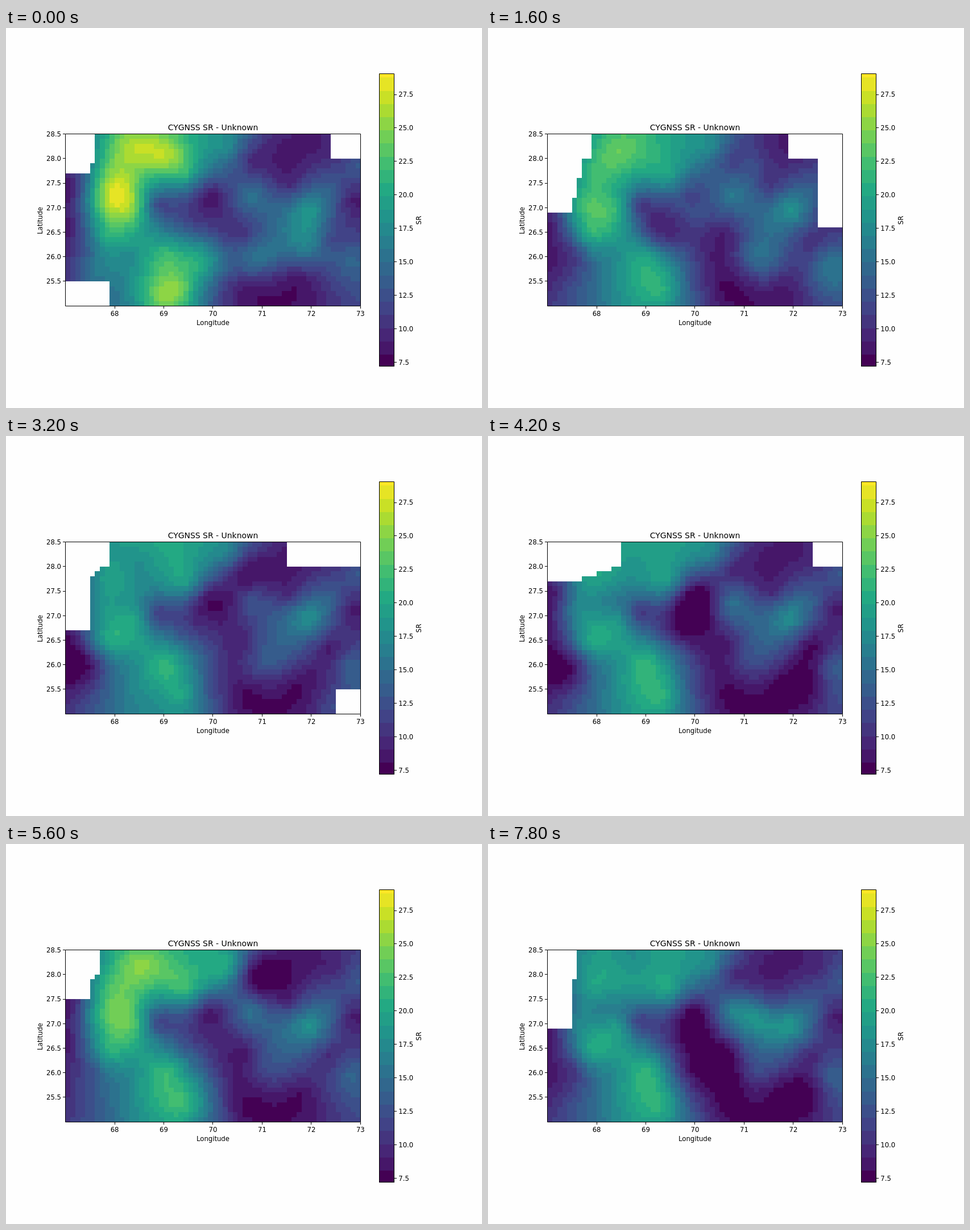
An HTML page with a canvas that plays this animation: 837 by 669 pixels, repeating every 8 s.

```html
<!DOCTYPE html>
<html lang="en">
<head>
<meta charset="utf-8">
<title>CYGNSS SR</title>
<style>
  html, body { margin: 0; width: 100%; height: 100%; overflow: hidden; background: #fefefe; }
  canvas, svg { position: absolute; left: 0; top: 0; display: block; }
  text { font: 11.63px "DejaVu Sans", sans-serif; fill: #000; }
  .title { font-size: 13.95px; }
  path { stroke: #000; stroke-width: 1; fill: none; }
</style>
</head>
<body>
<canvas id="map" width="837" height="669"></canvas>
<svg id="axes" width="837" height="669" viewBox="0 0 837 669"></svg>
<script>
const COLS = 60, ROWS = 35, CELL = 8.646, LEFT = 104.6, TOP = 186.6;
const STEP = 200, LOOP = 8000;
const VMIN = 7.18, VMAX = 29.05;
const BAR = { x: 656, y: 80, w: 27, h: 515.5 };
const ctx = document.getElementById('map').getContext('2d');

const clamp = (v, lo, hi) => Math.min(hi, Math.max(lo, v));

function triples(flat) {
  const out = [];
  for (let i = 0; i < flat.length; i += 3) out.push(flat.slice(i, i + 3));
  return out;
}

// Viridis, shown in bands of equal width
const STOPS = ['#440154', '#482475', '#414487', '#355f8d', '#2a788e', '#21918c',
  '#22a884', '#44bf70', '#7ad151', '#bddf26', '#fde725']
  .map(h => h.slice(1).match(/../g).map(c => parseInt(c, 16)));
const BAND = 0.04505, FIRST = 0.0398;

function colour(value) {
  const f = (value - VMIN) / (VMAX - VMIN);
  const band = Math.ceil((f - FIRST) / BAND);
  const p = band < 1 ? 0 : clamp(FIRST + (band - 0.5) * BAND, 0, 1) * 10;
  const i = Math.min(9, Math.floor(p));
  return `rgb(${STOPS[i].map((a, k) => Math.round(a + (STOPS[i + 1][k] - a) * (p - i)))})`;
}

// Smooth surface through scattered points (multiquadric plus a constant)
const kernel = (dx, dy) => Math.sqrt(dx * dx + dy * dy + 1.5);

function solve(m) {
  const n = m.length;
  for (let c = 0; c < n; c++) {
    let best = c;
    for (let r = c + 1; r < n; r++) if (Math.abs(m[r][c]) > Math.abs(m[best][c])) best = r;
    [m[c], m[best]] = [m[best], m[c]];
    for (let r = 0; r < n; r++) {
      if (r === c) continue;
      const k = m[r][c] / m[c][c];
      if (k) for (let j = c; j <= n; j++) m[r][j] -= k * m[c][j];
    }
  }
  return m.map((row, i) => row[n] / row[i]);
}

const overCells = fn =>
  Float64Array.from({ length: COLS * ROWS }, (_, i) => fn(i % COLS, Math.floor(i / COLS), i));

function surface(pts) {
  const rows = pts.map(([x, y, v]) => [...pts.map(([a, b]) => kernel(x - a, y - b)), 1, v]);
  rows.push([...pts.map(() => 1), 0, 0]);
  const weights = solve(rows), base = weights[pts.length];
  return overCells((x, y) =>
    pts.reduce((sum, [a, b], k) => sum + weights[k] * kernel(x - a, y - b), base));
}

// Typical terrain: column, row, value
const terrain = surface(triples([
  10,2,20, 17,2,22, 25,2,19.5, 33,2,17, 37,5,10, 46,2,8.5, 54,3,9.5, 59,6,13,
  8,7,20.5, 24,8,19.5, 1,10,9, 5,13,17, 10,12,20.5, 14,15,20.5, 18,14,12,
  29,12,8.5, 37,12,15.5, 45,10,10, 53,11,14, 58,13,9, 49,15,18, 30,16,9.5,
  1,18,9.5, 8,20,20, 25,18,11.5, 36,20,9, 44,19,14.5, 53,21,10, 5,24,11,
  20,24,21.5, 13,24,17.5, 33,25,9, 41,24,12.5, 57,25,14, 23,31,21, 28,30,14,
  36,31,7.5, 47,29,8, 4,31,12]));

const keys = [];
const SPREAD = 25;

// holes: sizes of empty corners, negative when measured from the right or bottom
// bumps: column, row, height added to the terrain
function key(time, holes, bumps) {
  const list = triples(bumps);
  const field = overCells((x, y, i) => clamp(list.reduce((v, [a, b, h]) =>
    v + h * Math.exp(-((x - a) ** 2 + (y - b) ** 2) / SPREAD), terrain[i]), VMIN, VMAX));
  keys.push({ time, holes, field });
}

key(0, [[6, 6], [5, 8], [-6, 5], [9, -5]],
  [12,2,5, 20,4,5, 10,12,8, 20,33,5, 5,26,4.5, 28,25,6, 37,25,5, 49,22,5]);
key(1600, [[9, 5], [7, 9], [6, 13], [5, 16], [-11, 5], [-5, 19]],
  [13,3,2.5, 41,6,3, 7,14,3, 29,14,3.5, 22,20,-5, 44,26,3.5, 57,29,2.5]);
key(2400, [[9, 5], [7, 6], [6, 7], [5, 18], [-15, 5], [-5, -5]],
  [14,4,-4.5, 35,6,-4.5, 37,13,-4, 28,19,3, 38,24,3, 2,24,-2.5, 19,32,-4, 53,33,3.5]);
key(4200, [[15, 5], [13, 6], [10, 7], [7, 8], [-6, 5]],
  [17,3,-3, 30,9,-4, 12,12,-4, 28,16,-3, 3,26,-2.5, 52,28,-3.5, 53,20,-2]);
key(5600, [[7, 5], [6, 6], [5, 10]],
  [14,3,3.5, 23,6,2, 32,4,3.5, 39,5,-3.5, 10,12,4, 4,25,2, 27,30,2.5]);
key(6800, [[8, 5], [5, 7]],
  [12,3,-4, 20,5,-4, 44,6,4, 11,12,-3, 27,13,-2.5, 50,21,-4.5, 30,25,-3]);
key(7800, [[6, 6], [5, 16]],
  [17,1,-4, 11,12,-4, 42,13,4.5, 29,16,-2.5, 28,24,-3.5, 36,24,-2.5, 52,29,-3.5]);

const px = col => Math.round(LEFT + col * CELL);
const py = row => Math.round(TOP + row * CELL);

function fillCells(x, y, w, h, fill) {
  ctx.fillStyle = fill;
  ctx.fillRect(px(x), py(y), px(x + w) - px(x), py(y + h) - py(y));
}

function drawMap(time) {
  let i = 0;
  while (i < keys.length - 2 && time >= keys[i + 1].time) i++;
  const a = keys[i], b = keys[i + 1];
  const mix = (time - a.time) / (b.time - a.time);
  a.field.forEach((v, n) =>
    fillCells(n % COLS, Math.floor(n / COLS), 1, 1, colour(v + (b.field[n] - v) * mix)));
  for (const [w, h] of (mix < 0.5 ? a : b).holes) {
    fillCells(w < 0 ? COLS + w : 0, h < 0 ? ROWS + h : 0, Math.abs(w), Math.abs(h), '#fefefe');
  }
}

function drawBar() {
  for (let y = 0; y < BAR.h; y++) {
    ctx.fillStyle = colour(VMAX - (y + 0.5) / BAR.h * (VMAX - VMIN));
    ctx.fillRect(BAR.x, BAR.y + y, BAR.w, 1);
  }
}

function drawAxes() {
  const snap = v => Math.floor(v) + 0.5;
  const label = (x, y, s, anchor, extra = '') =>
    `<text x="${x}" y="${y}" text-anchor="${anchor}" ${extra}>${s}</text>`;
  const upright = (x, y, s) => label(x, y, s, 'middle', `transform="rotate(-90 ${x} ${y})"`);
  let lines = 'M104.5 186.5H623.5V489.5H104.5ZM656.5 80.5H682.5V595.5H656.5Z';
  let texts = label(364, 180, 'CYGNSS SR - Unknown', 'middle', 'class="title"')
    + label(364, 523, 'Longitude', 'middle')
    + upright(64, 339, 'Latitude') + upright(729.5, 338.5, 'SR');
  for (let lon = 68; lon <= 73; lon++) {
    const x = LEFT + (lon - 67) * 10 * CELL;
    lines += `M${snap(x)} 490v4`;
    texts += label(x, 507, lon, 'middle');
  }
  for (let lat = 25.5; lat <= 28.5; lat += 0.5) {
    const y = TOP + (28.5 - lat) * 10 * CELL;
    lines += `M104 ${snap(y)}h-4`;
    texts += label(97, y + 4.4, lat.toFixed(1), 'end');
  }
  for (let v = 7.5; v <= 27.5; v += 2.5) {
    const y = 117 + (27.5 - v) * 23.56;
    lines += `M683 ${snap(y)}h4`;
    texts += label(690.3, y + 4.4, v.toFixed(1), 'start');
  }
  document.getElementById('axes').innerHTML = `<path d="${lines}"/>${texts}`;
}

drawBar();
drawAxes();
drawMap(0);

const start = performance.now();
let shown = 0;
function tick() {
  const time = Math.floor((performance.now() - start) % LOOP / STEP) * STEP;
  if (time !== shown) drawMap(shown = time);
  requestAnimationFrame(tick);
}
requestAnimationFrame(tick);
</script>
</body>
</html>
```
